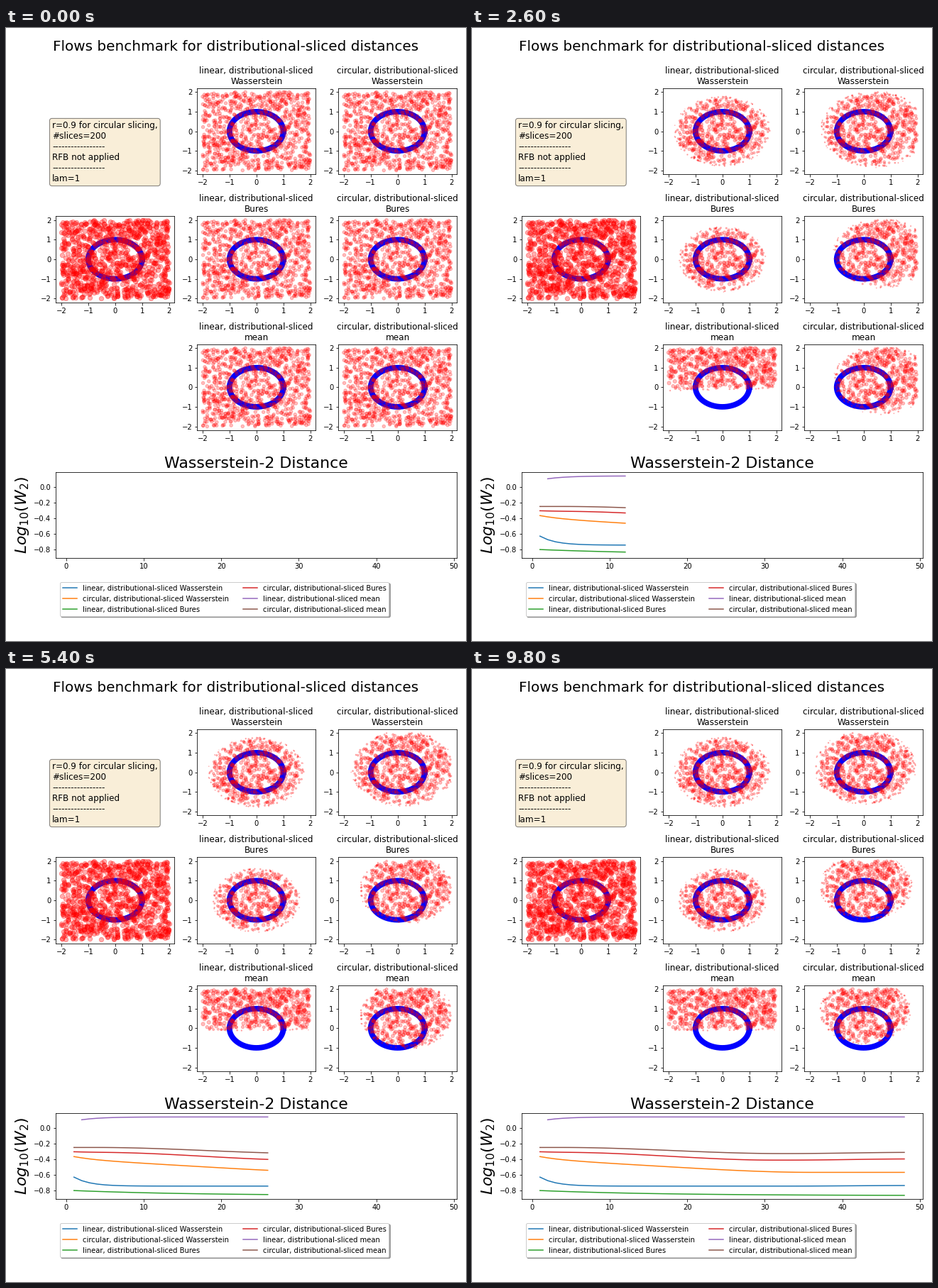
A matplotlib script for the animation above (10 s loop, 648x864 px).

```python
import numpy as np
import matplotlib.pyplot as plt
from matplotlib.animation import FuncAnimation

W, H, DPI = 648, 864, 72
FRAMES, STEP_MS = 50, 200
LEFT, TOP, PANEL_W, PANEL_H = 70.3, 84.8, 167, 121.5
COL_STEP, ROW_STEP = 198.95, 180.4
DOT = 20

plt.rcParams.update({"font.family": "DejaVu Sans", "font.size": 10,
                     "axes.titlesize": 12})
fig = plt.figure(figsize=(W / DPI, H / DPI), dpi=DPI, facecolor="white")

rng = np.random.RandomState(0)
points = rng.uniform(-2, 2, (1000, 2))
px, py = points.T


def ease(x, start, end):
    t = np.clip((x - start) / (end - start), 0, 1)
    return t * t * (3 - 2 * t)


def rise(x, tau):
    return 1 - np.exp(-(x - 1) / tau)


def add_axes(x, y, w, h):
    return fig.add_axes([x / W, 1 - (y + h) / H, w / W, h / H])


def add_panel(col, row, size, alpha, title=""):
    ax = add_axes(LEFT + COL_STEP * col, TOP + ROW_STEP * row, PANEL_W, PANEL_H)
    ax.set(xlim=(-2.2, 2.2), ylim=(-2.2, 2.2),
           xticks=range(-2, 3), yticks=range(-2, 3), title=title)
    a = np.linspace(0, 2 * np.pi, 200)
    ax.plot(np.cos(a), np.sin(a), color="blue", lw=7.8, zorder=1)
    return ax.scatter(px, py, s=size, color="red", alpha=alpha, zorder=2)


# Particle masses: a soft disc or half plane that drifts with the step
def disc(cx, cy, rx, ry, soft=0.22):
    r = np.hypot((px - cx) / rx, (py - cy) / ry)
    return np.clip((1 - r) / soft, 0, 1)


def drifting_disc(x0, x1, lift, r0, r1):
    def mass(k):
        t = (k - 1) / (FRAMES - 2)
        radius = r0 + (r1 - r0) * t
        return disc(x0 + (x1 - x0) * ease(k, 1, 45),
                    lift * (1 - (1 - t) ** 2), radius, radius)
    return mass


def linear_wasserstein(k):
    radius = 2.05 - 0.25 * rise(k, 1.5)
    return disc(0, 0, radius, radius)


def linear_bures(k):
    squeeze = 0.08 * rise(k, 18)
    return disc(0, 0, 1.58 + squeeze, 1.74 - 1.6 * squeeze)


def linear_mean(k):
    tilt = 0.1 * (1 - rise(k, 5))
    edge = -0.13 - tilt + (0.02 + tilt) * px
    return np.clip((py - edge) / 0.3, 0, 1)


# Distance curves
x = np.arange(1, FRAMES)
tail = 0.015 * ease(x, 33, 49)
curves = {
    "linear, distributional-sliced Wasserstein":
        -0.628 - 0.115 * rise(x, 2) + 0.5 * tail,
    "circular, distributional-sliced Wasserstein":
        -0.365 - 0.09 * rise(x, 5) - 0.112 * ease(x, 4, 36),
    "linear, distributional-sliced Bures":
        -0.8 - 0.065 * rise(x, 16),
    "circular, distributional-sliced Bures":
        -0.303 - 0.012 * rise(x, 4) - 0.095 * ease(x, 5, 31) + tail,
    "linear, distributional-sliced mean":
        np.where(x < 2, np.nan, 0.107 + 0.036 * rise(x - 1, 2.6)),
    "circular, distributional-sliced mean":
        -0.248 - 0.078 * ease(x, 4, 32) + tail,
}

# Static parts
fig.suptitle("Flows benchmark for distributional-sliced distances", fontsize=20)
dashes = "-" * 17
fig.text(65 / W, 1 - 131 / H,
         f"r=0.9 for circular slicing,\n#slices=200\n{dashes}\n"
         f"RFB not applied\n{dashes}\nlam=1",
         fontsize=12, va="top",
         bbox=dict(boxstyle="round", facecolor="wheat", alpha=0.5))
add_panel(0, 1, 40, 0.32)

# Mass rules and dot gains of the linear and circular flow in each row
rows = {
    "Wasserstein": ((linear_wasserstein, 1.1),
                    (drifting_disc(0.44, 0.06, 0.25, 2.0, 1.9), 1.05)),
    "Bures": ((linear_bures, 1.1),
              (drifting_disc(0.78, 0.09, 0.70, 1.82, 1.72), 1.1)),
    "mean": ((linear_mean, 1.3),
             (drifting_disc(0.80, 0.06, 0.87, 1.82, 1.70), 1.1)),
}
flows = []
for row, (kind, rules) in enumerate(rows.items()):
    for col, (slicing, rule) in enumerate(zip(("linear", "circular"), rules), 1):
        title = f"{slicing}, distributional-sliced\n{kind}"
        flows.append((add_panel(col, row, DOT, 0.25, title), *rule))

chart = add_axes(LEFT, 626.2, 2 * COL_STEP + PANEL_W, 121)
chart.set(xlim=(-1.33, 50.4), ylim=(-0.91, 0.19),
          xticks=range(0, 51, 10), yticks=np.arange(-4, 1) / 5)
chart.set_title("Wasserstein-2 Distance", fontsize=22)
chart.set_ylabel("$Log_{10}(W_2)$", fontsize=22)
lines = [chart.plot([], [], label=name)[0] for name in curves]
fig.legend(handles=lines, loc="upper left", ncol=2, fontsize=10, shadow=True,
           fancybox=True, borderaxespad=0,
           bbox_to_anchor=(75.5 / W, 1 - 780.7 / H))


def draw(k):
    for dots, mass, gain in flows:
        size = DOT * (gain * mass(k) if k else np.ones(len(points)))
        alive = size > 0.15
        dots.set_offsets(points[alive])
        dots.set_sizes(size[alive])
    n = max(k - 1, 0)
    for line, values in zip(lines, curves.values()):
        line.set_data(x[:n], values[:n])
    return [flow[0] for flow in flows] + lines


anim = FuncAnimation(fig, draw, frames=FRAMES, init_func=lambda: draw(0),
                     interval=STEP_MS, repeat=True, repeat_delay=0, blit=False)
plt.show()
```
